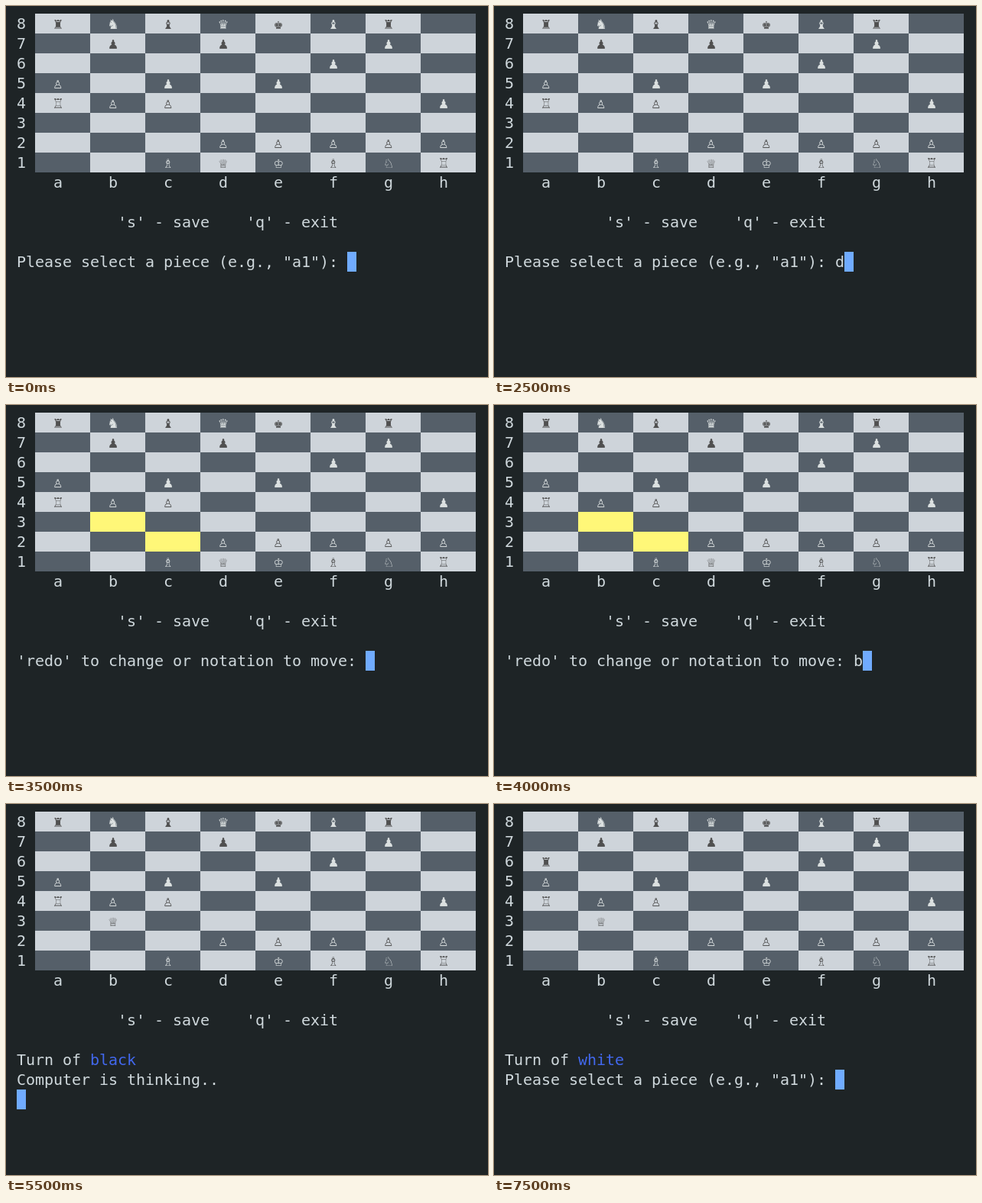
These frames come from a looping animation (630x486 px, 8000 ms). An HTML page with a canvas:

```html
<!DOCTYPE html>
<html lang="en">
<head>
<meta charset="utf-8">
<title>Terminal chess</title>
<style>
html, body { margin: 0; width: 100%; height: 100%; overflow: hidden; background: #1e2426; }
canvas { display: block; }
</style>
</head>
<body>
<canvas id="stage" width="630" height="486"></canvas>
<script>
const ctx = document.getElementById("stage").getContext("2d");
const LOOP = 8000, LEFT = 14, TOP = 10, CHAR = 12, LINE = 26;
const BG = "#1e2426", TEXT = "#cfd8dc", CURSOR = "#70abff", BLUE = "#4268ee";
const LIGHT = "#ced4da", DARK = "#555f69", MARK = "#fff778", INK = "#505050", PALE = "#dbe0e0";

const START = [
  "♜♞♝♛♚♝♜.",
  ".♟.♟..♟.",
  ".....♟..",
  "♙.♟.♟...",
  "♖♙♙....♟",
  "........",
  "...♙♙♙♙♙",
  "..♗♕♔♗♘♖"
];

// Squares are named as in "b3".
function move(board, from, to) {
  const next = board.map(row => [...row]);
  const at = s => [8 - s[1], "abcdefgh".indexOf(s[0])];
  const [r1, c1] = at(from), [r2, c2] = at(to);
  next[r2][c2] = next[r1][c1];
  next[r1][c1] = ".";
  return next;
}

const queenMoved = move(START, "d1", "b3");
const rookMoved = move(queenMoved, "a8", "a6");
const SELECT = 'Please select a piece (e.g., "a1"): ';
const TARGET = "'redo' to change or notation to move: ";
const THINKING = ["Turn of black", "Computer is thinking.."];

// Start time, board, lines below the menu (cursor ends the last one), marked squares
const STEPS = [
  [0, START, [SELECT]],
  [2500, START, [SELECT + "d"]],
  [3000, START, [SELECT + "d1"]],
  [3500, START, [TARGET], ["b3", "c2"]],
  [4000, START, [TARGET + "b"], ["b3", "c2"]],
  [5000, START, [TARGET + "b3"], ["b3", "c2"]],
  [5500, queenMoved, [...THINKING, ""]],
  [6500, queenMoved, [...THINKING, "Computer moved Rook", ""]],
  [7500, rookMoved, ["Turn of white", SELECT]]
];

function box(col, row, width, color) {
  ctx.fillStyle = color;
  ctx.fillRect(LEFT + col * CHAR, TOP + row * LINE, width * CHAR, LINE);
}

function print(text, col, row, color = TEXT) {
  ctx.fillStyle = color;
  [...text].forEach((ch, i) => ctx.fillText(ch, LEFT + (col + i) * CHAR, TOP + row * LINE + 20));
}

function drawBoard(board, marks) {
  for (let r = 0; r < 8; r++) {
    print(String(8 - r), 0, r);
    for (let c = 0; c < 8; c++) {
      const light = (r + c) % 2 === 0, col = 2 + c * 6;
      const marked = marks.includes("abcdefgh"[c] + (8 - r));
      box(col, r, 6, marked ? MARK : light ? LIGHT : DARK);
      if (board[r][c] !== ".") print(board[r][c], col + 2, r, light ? INK : PALE);
    }
  }
  print("a     b     c     d     e     f     g     h", 4, 8);
}

function draw(now) {
  const t = now % LOOP;
  const [, board, lines, marks = []] = STEPS.findLast(step => step[0] <= t);
  ctx.fillStyle = BG;
  ctx.fillRect(0, 0, 630, 486);
  ctx.font = '20px "DejaVu Sans Mono", monospace';
  drawBoard(board, marks);
  print("'s' - save    'q' - exit", 11, 10);
  lines.forEach((line, i) => {
    print(line, 0, 12 + i);
    if (line.startsWith("Turn of ")) {
      box(8, 12 + i, 5, BG);
      print(line.slice(8), 8, 12 + i, BLUE);
    }
  });
  box(lines.at(-1).length, 11 + lines.length, 1, CURSOR);
}

const began = performance.now();
function frame() {
  draw(performance.now() - began);
  requestAnimationFrame(frame);
}
frame();
</script>
</body>
</html>
```
